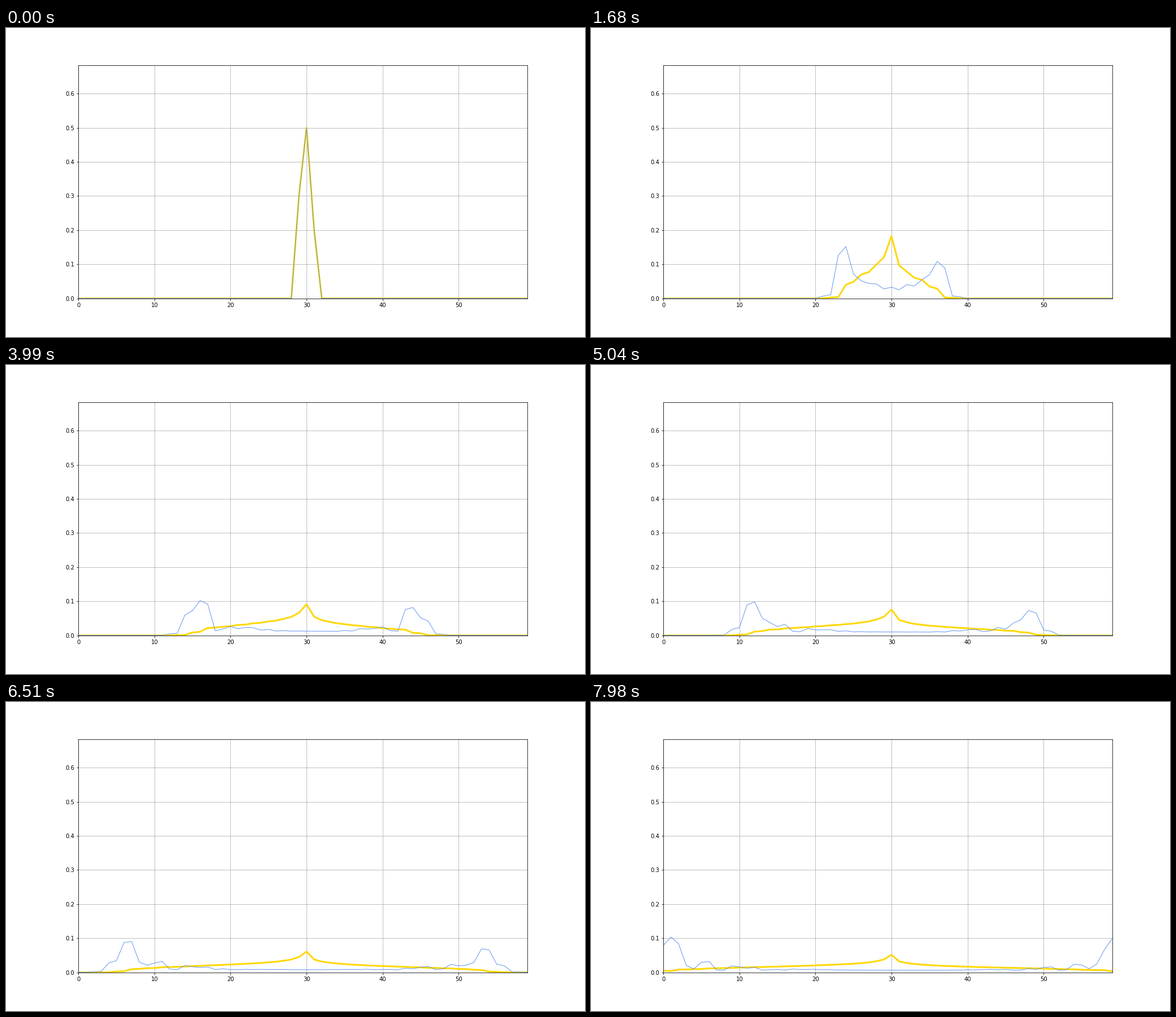
Write a matplotlib script that moves like this. It is 1025 by 547 pixels and loops after 8 s.

```python
import numpy as np
import matplotlib.pyplot as plt
from matplotlib.animation import FuncAnimation

SITES, START = 60, 30
STEP_MS, LOOP_MS, TICK_MS = 210, 8000, 20
STEPS = LOOP_MS // STEP_MS + 1
THETA, PHASE = np.radians(38), np.radians(78)


def quantum_walk(steps):
    """Position probabilities of a coined walk on a ring, one row per step."""
    c, s = np.cos(THETA), np.sin(THETA)
    left = np.zeros(SITES, complex)
    right = np.zeros(SITES, complex)
    left[START] = 1 / np.sqrt(2)
    right[START] = np.exp(1j * PHASE) / np.sqrt(2)
    rows = []
    for _ in range(steps):
        rows.append(abs(left) ** 2 + abs(right) ** 2)
        left, right = (np.roll(c * left + s * right, -1),
                       np.roll(s * left - c * right, 1))
    return np.array(rows)


prob = quantum_walk(STEPS + 1)
# Neighbouring steps are averaged because each one fills only every other site.
current = (prob[:-1] + prob[1:]) / 2
average = [prob[:max(k, 1) + 1].mean(axis=0) for k in range(STEPS)]

fig = plt.figure(figsize=(1025.01 / 72, 547.01 / 72), dpi=72, facecolor="white")
ax = fig.add_axes([0.125, 0.125, 0.775, 0.755])
ax.set_xlim(0, SITES - 1)
ax.set_ylim(0, 0.6835)
ax.grid(True)

x = np.arange(SITES)
average_line, = ax.plot(x, average[0], color="gold", lw=3)
current_line, = ax.plot(x, current[0], color="cornflowerblue", lw=1)


def update(i):
    k = min(int((i + 0.5) * TICK_MS) // STEP_MS, STEPS - 1)
    average_line.set_ydata(average[k])
    current_line.set_ydata(current[k])
    return average_line, current_line


anim = FuncAnimation(fig, update, frames=LOOP_MS // TICK_MS, interval=TICK_MS,
                     repeat=True, repeat_delay=0, blit=False)
plt.show()
```
